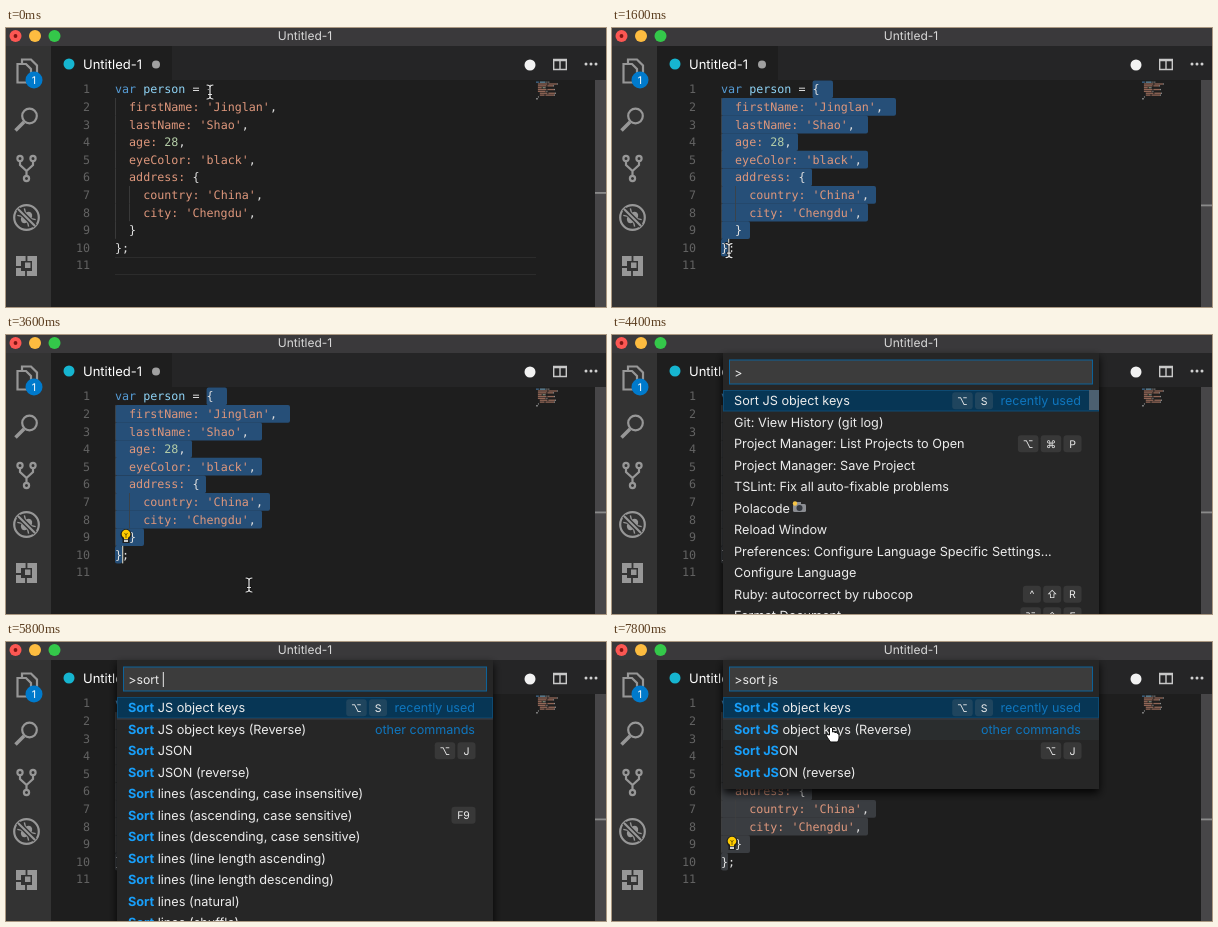
Animation of 600x279 px, one loop 8 s. Source, as an HTML page:

```html
<!DOCTYPE html>
<html lang="en">
<head>
<meta charset="utf-8">
<title>Untitled-1</title>
<style>
  html, body { margin: 0; height: 100%; overflow: hidden; background: #1e1e1e; }
  svg { display: block; width: 100vw; height: 100vh; }
  text { white-space: pre; text-rendering: geometricPrecision; font: 12.7px Inter, 'DejaVu Sans', sans-serif; fill: #ececec; }
  .code text { font: 11.7px 'DejaVu Sans Mono', monospace; }
  .match { font-weight: 700; fill: #189ffa; }
  text.key { font-size: 10.5px; text-anchor: middle; }
  text.note { font-size: 12.55px; text-anchor: end; fill: #0f76be; }
  .icon { fill: none; stroke: #979797; stroke-width: 2.2; }
</style>
</head>
<body>
<svg viewBox="0 0 600 279" preserveAspectRatio="none">
  <defs>
    <filter id="shadow" x="-10%" y="-10%" width="120%" height="120%">
      <feDropShadow dx="0" dy="4" stdDeviation="4" flood-color="#000" flood-opacity=".9"/>
    </filter>
    <path id="beamShape" d="M-3-7Q0-7 0-4.500Q0-7 3-7M0-5V5M-3 7Q0 7 0 4.500Q0 7 3 7M-1.500 2.500H1.500"/>
    <g id="beam" fill="none" stroke-linecap="round">
      <use href="#beamShape" stroke="#111" stroke-width="2.600"/>
      <use href="#beamShape" stroke="#e8e8e8" stroke-width="1.200"/>
    </g>
    <path id="hand" d="M-2.500 1V-6Q-1-8 .5-6V-2Q2-3 3-1.500Q4.500-2 5.500-.5Q7-.5 7 1V4Q7 6 5.500 8H-1.500L-5 3Q-6 1-4.500 .5Z" fill="#fff" stroke="#111"/>
  </defs>

  <rect width="600" height="279" fill="#1e1e1e"/>
  <rect x="45" y="18" width="555" height="34" fill="#252526"/>
  <rect x="45" y="18" width="121" height="34" fill="#1e1e1e"/>
  <rect y="18" width="45" height="261" fill="#333"/>
  <rect width="600" height="18" fill="#3a393b"/>
  <circle cx="9.500" cy="8" r="6" fill="#fc5753"/>
  <circle cx="9.500" cy="8" r="1.900" fill="#7d1512"/>
  <circle cx="29" cy="8" r="6" fill="#fdbc40"/>
  <circle cx="48.500" cy="8" r="6" fill="#34c84a"/>
  <text x="299" y="12" text-anchor="middle" style="font-size:12px;fill:#d8d8d8">Untitled-1</text>
  <circle cx="63" cy="36" r="5.500" fill="#16b5d0"/>
  <text x="77" y="41" style="font-size:13px;fill:#fff">Untitled-1</text>
  <circle cx="150" cy="36.500" r="4" fill="#a0a0a0"/>
  <circle cx="524" cy="37" r="5.500" fill="#f2f2f2"/>
  <path d="M547.700 31.500H560.300V41.500H547.700ZM554 31V42M547.700 32.500H560.300" fill="none" stroke="#c8c8c8" stroke-width="1.400"/>
  <g fill="#d0d0d0"><circle cx="580" cy="36" r="1.500"/><circle cx="585" cy="36" r="1.500"/><circle cx="590" cy="36" r="1.500"/></g>

  <g class="icon">
    <path d="M16 35V31.500H25L31 37.500V49H26M11.500 36H20L25 41V54.500H11.500Z"/>
    <circle cx="23.500" cy="88" r="7.300"/><path d="M18 94L9.500 102.500" stroke-width="3.500"/>
    <circle cx="14" cy="130.500" r="2.600"/><circle cx="27" cy="130.500" r="2.600"/><circle cx="20.500" cy="150.500" r="2.600"/>
    <path d="M14 133V137L20.500 143V148M27 133V137L20.500 143"/>
    <circle cx="20.500" cy="189.500" r="12.300"/>
    <g transform="translate(20.500 189.500) rotate(45)">
      <ellipse rx="3.500" ry="5.500" fill="#979797"/>
      <path d="M-8-5L-4-2.500M8-5L4-2.500M-8.500 0H8.500M-8 5L-4 2.500M8 5L4 2.500" stroke-width="1.400"/>
    </g>
    <path d="M12 181L29 198" stroke="#333" stroke-width="5"/>
    <path d="M12 181L29 198"/>
    <path d="M12.500 230.500H28.500V245.500H12.500Z" stroke-width="5"/>
    <path d="M20.500 228V234M10 239H16M20 248V243" stroke="#333" stroke-width="1.800"/>
    <path d="M19 234.500H24.500V240H19Z" fill="#979797" stroke="none"/>
  </g>
  <circle cx="28" cy="52" r="8.500" fill="#007acc"/>
  <text x="28" y="56" text-anchor="middle" style="font-size:10.500px;fill:#fff">1</text>

  <g id="selection"></g>
  <g id="code" class="code"></g>
  <g id="overlay"></g>
</svg>

<script>
const LOOP = 8000, STEP = 200;
const LEFT = 109, CHAR = 7.045, TOP = 52.4, LINE = 17.6;
const ROW_TOP = 55, ROW = 21.5;
const $ = id => document.getElementById(id);

const source = `var person = {
  firstName: 'Jinglan',
  lastName: 'Shao',
  age: 28,
  eyeColor: 'black',
  address: {
    country: 'China',
    city: 'Chengdu',
  }
};
`.split('\n');

const rect = (x, y, w, h, fill, more = '') =>
  `<rect x="${x}" y="${y}" width="${w}" height="${h}" fill="${fill}" ${more}/>`;
const text = (x, y, body, more = '') => `<text x="${x}" y="${y}" ${more}>${body}</text>`;
const use = (id, x, y) => `<use href="#${id}" x="${x}" y="${y}"/>`;

function colorOf(token) {
  if (token === 'var') return '#569cd6';
  if (token === 'person') return '#8fd3f5';
  if (/^\d/.test(token)) return '#b5cea8';
  return /^['\w]/.test(token) ? '#de977c' : '#e0e0e0';
}

function drawCode() {
  let out = '';
  source.forEach((line, i) => {
    const y = TOP + LINE * i;
    out += text(84, y + 13, i + 1, 'text-anchor="end" style="fill:#636363"');
    const indent = i > 0 && i < 9 ? (i === 6 || i === 7 ? 2 : 1) : 0;
    for (let g = 0; g < indent; g++) out += rect(LEFT + g * 2 * CHAR, y, .8, LINE, '#404040');
    for (const { 0: token, index } of line.matchAll(/'[^']*'|\w+:?|\S/g)) {
      const color = colorOf(token);
      out += text(LEFT + index * CHAR, y + 13, token, `style="fill:${color}"`);
      out += rect(530 + index * .95, 53.5 + i * 1.85, token.length * .95, 1.3, color, 'opacity=".6"');
    }
  });
  $('code').innerHTML = out;
}

// Pointer way points: time, x, y
const path = [
  [0, 204, 64], [400, 204, 64], [600, 196, 84], [800, 170, 128], [1000, 148, 160],
  [1200, 124, 212], [1400, 117, 222], [2400, 117, 225], [3600, 243, 250], [6600, 243, 250],
  [7200, 238, 182], [7400, 234, 135], [7600, 222, 98], [7800, 220, 92]
];

function pointerAt(t) {
  const next = path.findIndex(p => p[0] > t);
  if (next < 0) return path.at(-1).slice(1);
  const [t0, x0, y0] = path[next - 1], [t1, x1, y1] = path[next];
  const k = (t - t0) / (t1 - t0);
  return [x0 + (x1 - x0) * k, y0 + (y1 - y0) * k];
}

const PALETTE_OPENS = 3800;
const typed = [[3800, ''], [4600, 'so'], [4800, 'sor'], [5000, 'sort'], [5400, 'sort '], [6000, 'sort j'], [6200, 'sort js']];

// Row format: label|keys|note, with *matched* parts
const recent = `Sort JS object keys|⌥ S|recently used
Git: View History (git log)
Project Manager: List Projects to Open|⌥ ⌘ P
Project Manager: Save Project
TSLint: Fix all auto-fixable problems
Polacode
Reload Window
Preferences: Configure Language Specific Settings...
Configure Language
Ruby: autocorrect by rubocop|^ ⇧ R
Format Document|⌥ ⇧ F`.split('\n');
const partial = `*Sor*t JS object keys|⌥ S|recently used
Add Cur*sor* Above|⌥ ⌘ ↑|other commands
Add Cur*sor* Below|⌥ ⌘ ↓
Add Cur*sor*s to Line Ends|⇧ ⌥ I
Go: Benchmark Function At Cur*sor*
Go: Test Function At Cur*sor*
*So*largraph: Download current *R*uby documentation
*So*largraph: *R*estart Solargraph
*So*largraph: Search *R*uby Documentation|⇧ ⌘ R
*Sor*t JS object keys (Reverse)
*Sor*t JSON|⌥ J`.split('\n');
const sorts = `Sort JS object keys|⌥ S|recently used
Sort JS object keys (Reverse)||other commands
Sort JSON|⌥ J
Sort JSON (reverse)
Sort lines (ascending, case insensitive)
Sort lines (ascending, case sensitive)|F9
Sort lines (descending, case sensitive)
Sort lines (line length ascending)
Sort lines (line length descending)
Sort lines (natural)
Sort lines (shuffle)`.split('\n');

function rowsFor(query) {
  if (!query) return recent;
  if (query.length < 4) return partial;
  const n = query.trim().length;
  return sorts.filter(row => row.toLowerCase().startsWith(query))
    .map(row => `*${row.slice(0, n)}*${row.slice(n)}`);
}

const keyWidths = { '⌥': 20.5, '⌘': 20.5, F9: 24, I: 13 };

function drawKeys(keys, right, cy) {
  let out = '';
  for (const key of keys.split(' ').reverse()) {
    const w = keyWidths[key] ?? 18;
    out += rect(right - w, cy - 8.5, w, 17, 'rgba(128,128,128,.2)', 'rx="3"') + text(right - w / 2, cy + 4, key, 'class="key"');
    right -= w + 2.3;
  }
  return out;
}

const camera = rect(181, 169, 13, 8, '#8b8d92', 'rx="1.5"') + rect(184, 167, 5, 3, '#8b8d92') +
  '<circle cx="187.5" cy="173" r="3" fill="#34383f"/><circle cx="183" cy="168.500" r="2.200" fill="#f7c545"/>';

function drawPalette(query, hovered, caretOn) {
  const rows = rowsFor(query);
  const height = Math.min(290, ROW_TOP + rows.length * ROW + 6) - 18;
  let out = rect(111, 18, 376, height, '#252526', 'filter="url(#shadow)"');
  out += rect(117.5, 25, 363, 24, '#3c3c3c', 'stroke="#0d6299"');
  out += text(122.3, 41.5, '&gt;' + query, 'id="query" style="font-size:12.300px"');
  if (caretOn) out += rect(123, 30, 1, 15, '#e8e8e8', 'id="caret"');
  rows.forEach((row, i) => {
    const [label, keys, note] = row.split('|');
    const y = ROW_TOP + i * ROW, cy = y + 10.7;
    if (i === 0) out += rect(111.5, y + .5, 375, ROW - 1, '#073655', 'stroke="#0e4a72"');
    else if (i === hovered) out += rect(111, y, 376, ROW, '#2a2d2e');
    if (i === 1 && note) out += rect(111, y, 376, 1, '#3f3f46');
    out += text(122, cy + 4.4, label.replace(/\*(.*?)\*/g, '<tspan class="match">$1</tspan>'));
    if (note) out += text(469, cy + 4.4, note, 'class="note"');
    if (keys) out += drawKeys(keys, !note ? 469.5 : i ? 361 : 381, cy);
  });
  if (!query) out += camera + rect(477, ROW_TOP, 10, 20, '#4c6070');
  return out;
}

// Right edge of the highlight on each fully selected line
const lineEnds = [221, 284, 256, 186, 256, 200, 264, 256, 138];

function drawSelection(t) {
  if (t < 400) return rect(LEFT, 229, 421, 1, '#2c2c2c') + rect(LEFT, 246, 421, 1, '#2c2c2c');
  const [x, y] = pointerAt(Math.min(t, 2400));
  const lastLine = Math.floor((y - 6 - TOP) / LINE);
  const head = LEFT + Math.round((x - LEFT) / CHAR) * CHAR;
  const focused = t < PALETTE_OPENS;
  let out = '';
  for (let i = 0; i <= lastLine; i++) {
    const from = i ? LEFT : LEFT + 13 * CHAR, to = i < lastLine ? lineEnds[i] : head;
    out += rect(Math.min(from, to), TOP + i * LINE, Math.abs(to - from), LINE + .2, focused ? '#264f78' : '#3a3d41', 'rx="2"');
  }
  const blinkOn = t < 1400 || Math.floor((t - 1400) / 500) % 2 === 0;
  if (focused && blinkOn) out += rect(head, TOP + lastLine * LINE, 1.2, LINE, '#c4c4b8');
  return out;
}

const bulb = '<path d="M116.500 204Q114 201.500 114.500 198.500Q116 194 120 194T125.500 198.500Q126 201.500 123.500 204V208H116.500Z" fill="#1e1e1e"/>' +
  '<circle cx="120" cy="199" r="4.300" fill="#ffcc00"/>' + rect(118, 202, 4, 2, '#ffcc00') + rect(118, 204.7, 4, 2.3, '#d0d0d0') +
  '<path d="M118.500 198L120 200L121.500 198M120 200V203" fill="none" stroke="#5a4700" stroke-width=".8"/>';

function draw(t) {
  const [x, y] = pointerAt(t);
  const open = t >= PALETTE_OPENS;
  const markY = t < 400 ? 164 : 176.5;
  $('selection').innerHTML = drawSelection(t) + rect(589, 52, 11, 227, '#474648') + rect(589, markY, 11, 1.8, '#8a8a8a');

  let out = t >= 1800 ? bulb : '';
  if (open) {
    const [since, query] = typed.filter(([start]) => start <= t).at(-1);
    const hovered = t >= 6600 ? Math.floor((y - ROW_TOP) / ROW) : -1;
    out += drawPalette(query, hovered, Math.floor((t - since) / 500) % 2 === 0);
  }
  if (!open || t >= 6600) out += use(open && y < 147 ? 'hand' : 'beam', x, y);
  $('overlay').innerHTML = out;
  if ($('caret')) $('caret').setAttribute('x', 122.5 + $('query').getComputedTextLength());
}

let shown = -1;
function tick() {
  const t = Math.floor(performance.now() % LOOP / STEP) * STEP;
  if (t !== shown) draw(shown = t);
  requestAnimationFrame(tick);
}
drawCode();
tick();
</script>
</body>
</html>
```
